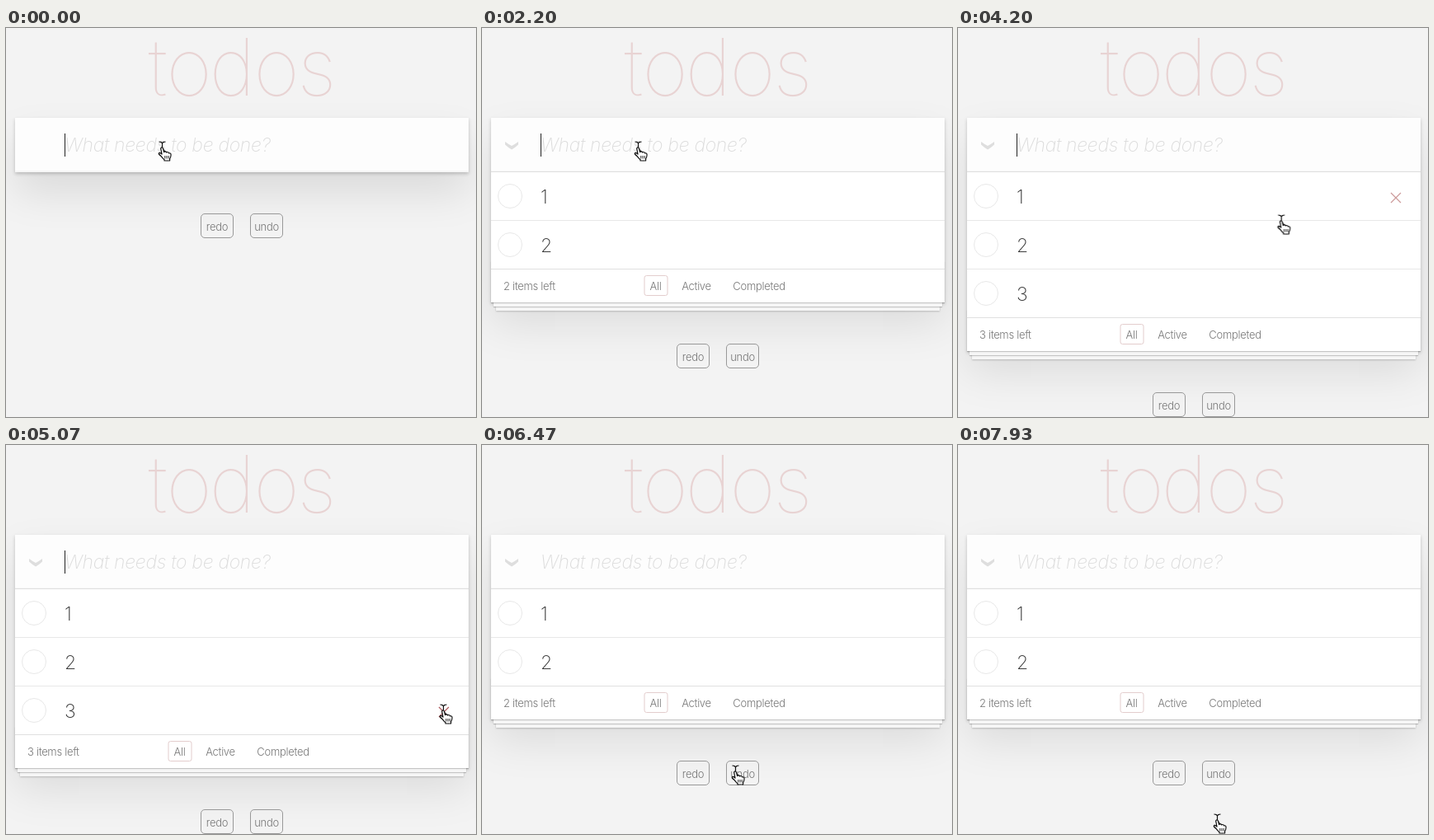
An HTML page that plays this animation: 570x472 px, repeating every 8 s.

```html
<!DOCTYPE html>
<html lang="en">
<head>
<meta charset="utf-8">
<title>todos</title>
<style>
@property --n { syntax: "<integer>"; inherits: true; initial-value: 0; }
@property --typing { syntax: "<integer>"; inherits: true; initial-value: 0; }

html, body { margin: 0; width: 570px; height: 472px; overflow: hidden; background: #f3f3f3; }
body { position: relative; font: 300 13px Inter, "Liberation Sans", sans-serif; letter-spacing: -.3px; color: #777; }
body, .caret, .del, .cursor, .cursor g { animation: 8s step-end infinite; }
body { animation-name: items, typing; }

.title { position: absolute; left: 0; top: 0; fill: #e8d3d3; font-size: 96px; font-weight: 100; letter-spacing: 0; text-anchor: middle; }
.app { position: absolute; left: 11px; top: 109px; width: 550px; }
.panel {
  position: relative;
  height: calc(66px + min(1, var(--n)) * 40px + var(--n) * 59px);
  background: #fff;
  box-shadow: 0 2px 4px rgba(0,0,0,.2), 0 25px 50px rgba(0,0,0,.1);
}
.panel > *, .entry > *, footer > * { position: absolute; }
.entry, .row { font-size: 23px; font-weight: 200; color: #333; }
.entry { inset: 0 0 auto; height: 66px; line-height: 66px; background: #fdfdfd; box-shadow: inset 0 -2px 1px rgba(0,0,0,.03); }
.hint { left: 60px; font-style: italic; color: #dcdcdc; white-space: nowrap; opacity: calc(1 - var(--typing)); }
.typed { left: 60px; opacity: var(--typing); counter-reset: next calc(var(--n) + 1); }
.typed::before { content: counter(next); }
.caret {
  left: calc(60px + var(--typing) * 13px); top: calc(19px - var(--typing) * 1px);
  width: 1px; height: 28px; background: #222; animation-name: caret;
}
.chevron { left: 16px; top: 28px; fill: #dedede; opacity: var(--n); }

.list { inset: 65px 0 40px; overflow: hidden; border-top: 1px solid #e0e0e0; opacity: var(--n); }
.row { position: relative; height: 58px; line-height: 60px; padding-left: 60px; border-bottom: 1px solid #e8e8e8; }
.row::before {
  content: ""; position: absolute; left: 8px; top: 14px; width: 28px; height: 28px;
  border: 1px solid #e8e8e8; border-radius: 50%;
}
.del { left: 513px; width: 14px; height: 14px; stroke: #cc9a9a; animation-name: del; }

footer { inset: auto 0 0; height: 40px; line-height: 41px; border-top: 1px solid #e0e0e0; opacity: var(--n); }
footer::before {
  content: ""; position: absolute; inset: auto 0 0; height: 50px;
  box-shadow: 0 1px 1px rgba(0,0,0,.2), 0 8px 0 -3px #f6f6f6, 0 9px 1px -3px rgba(0,0,0,.2),
    0 16px 0 -6px #f6f6f6, 0 17px 2px -6px rgba(0,0,0,.2);
}
.count { left: 15px; counter-reset: left var(--n); }
.count::before { content: counter(left); }
.filter { transform: translateX(-50%); }
.all { left: 199.5px; top: 7px; width: 27px; height: 23px; line-height: 25px; text-align: center; border: 1px solid #e3cdcd; border-radius: 3px; }

.buttons { position: relative; margin-top: 50px; }
.buttons span {
  position: absolute; box-sizing: border-box; width: 40px; height: 30px; line-height: 30px;
  text-align: center; border: 1px solid #999; border-radius: 5px;
}

.pointer { position: absolute; inset: 0; }
.cursor { animation-name: move; }
.ibeam { animation-name: ibeam; }
.arrow { animation-name: arrow; }
.hand { animation-name: hand; }

@keyframes items {
  0% { --n: 0 } 15.875% { --n: 1 } 27.5% { --n: 2 } 38.375% { --n: 3 }
  64.125% { --n: 2 } 85% { --n: 3 } 99.125%, 100% { --n: 2 }
}
@keyframes typing {
  0%, 15.875%, 27.5%, 38.375%, 100% { --typing: 0 }
  10.875%, 20.875%, 32.5% { --typing: 1 }
}
@keyframes caret {
  0%, 8.375%, 50.875%, 62.5% { opacity: 1 }
  2.5%, 45%, 57.125%, 64.125%, 100% { opacity: 0 }
}
@keyframes del {
  0% { opacity: 0; top: 90px }
  50.25% { opacity: 1; top: 90px }
  53.3% { opacity: 1; top: 149px }
  56.5% { opacity: 1; top: 208px; stroke: #cc9a9a }
  58.4% { opacity: 1; top: 208px; stroke: #bd7a7c }
  60% { opacity: 1; top: 208px; stroke: #af5b5e }
  64.125%, 100% { opacity: 0; top: 208px }
}
@keyframes move {
  0% { transform: translate(189px, 145px) }
  47.5% { transform: translate(189px, 145px); animation-timing-function: steps(3, start) }
  50% { transform: translate(255px, 172px); animation-timing-function: steps(6, start) }
  55% { transform: translate(460px, 265px); animation-timing-function: steps(3, start) }
  57.5% { transform: translate(521px, 311px) }
  58.375% { transform: translate(521px, 311px); animation-timing-function: steps(3, start) }
  60% { transform: translate(530px, 322px) }
  68.375% { transform: translate(530px, 322px); animation-timing-function: steps(11, start) }
  76.625% { transform: translate(301px, 398px) }
  78.375% { transform: translate(301px, 398px); animation-timing-function: steps(4, start) }
  80.875% { transform: translate(307px, 396px) }
  90% { transform: translate(307px, 396px); animation-timing-function: steps(6, start) }
  94.125%, 100% { transform: translate(314px, 455px) }
}
@keyframes ibeam {
  0%, 47.5% { opacity: 1 }
  .875%, 50.25%, 100% { opacity: 0 }
}
@keyframes arrow {
  0%, 75.5%, 93.3% { opacity: 0 }
  50.25%, 85%, 99.125%, 100% { opacity: 1 }
}
@keyframes hand {
  0%, 85%, 99.125%, 100% { opacity: 0 }
  75.5%, 93.3% { opacity: 1 }
}
</style>
</head>
<body>
<svg class="title" width="570" height="100"><text x="184 222 274.5 328 377" y="82">todos</text></svg>

<div class="app">
  <div class="panel">
    <div class="entry">
      <span class="hint">What needs to be done?</span>
      <span class="typed"></span>
      <i class="caret"></i>
      <svg class="chevron" width="18" height="12"><path d="M1 1Q5 4 9 6Q13 4 17 1V4.600Q13 8.500 9 10.500Q5 8.500 1 4.600Z"/></svg>
    </div>
    <div class="list">
      <div class="row">1</div>
      <div class="row">2</div>
      <div class="row">3</div>
    </div>
    <svg class="del" viewBox="0 0 14 14"><path d="M1 1L13 13M13 1L1 13" stroke-width="1.200"/></svg>
    <footer>
      <span class="count"> items left</span>
      <span class="filter all">All</span>
      <span class="filter" style="left:249px">Active</span>
      <span class="filter" style="left:325px">Completed</span>
    </footer>
  </div>
  <div class="buttons">
    <span style="left:225px">redo</span>
    <span style="left:285px">undo</span>
  </div>
</div>

<svg class="pointer" width="570" height="472">
  <g class="cursor">
    <g class="ibeam" fill="none" stroke="#111" stroke-width="1.200">
      <path d="M-3.500-7Q0-7 .5-5Q1-7 4.500-7M.5-5V6M-3.500 8Q0 8 .5 6Q1 8 4.500 8M-1.500 2H2.500"/>
    </g>
    <g class="arrow" stroke="#fff" stroke-linejoin="round">
      <path d="M.5 0V14.500L3.800 11.400L6 17L8.600 16L6.300 10.600H11Z"/>
    </g>
    <g class="hand" fill="#fff" stroke="#111" stroke-width="1.200" stroke-linejoin="round">
      <path d="M-1.300 1.200Q-1-.3.4 0Q1.300.3 1.600 1.600L2.600 5.600Q3 4.600 4.300 4.900Q5.400 5.200 5.600 6Q6.400 5.200 7.600 5.700Q8.500 6.100 8.600 7Q9.600 6.400 10.500 7.200Q11.300 8 11 9.800Q10.800 12 9.600 13.600V16H3V14.800Q.8 12.800-.6 10.800Q-2.400 9.400-3.600 8Q-4 6.600-2.600 6.400Q-1.400 6.600 0 8Z"/>
      <path d="M3.800 10V13.500M6 10V13.500M8.200 10V13.500" stroke-width=".9"/>
    </g>
  </g>
</svg>
</body>
</html>
```
